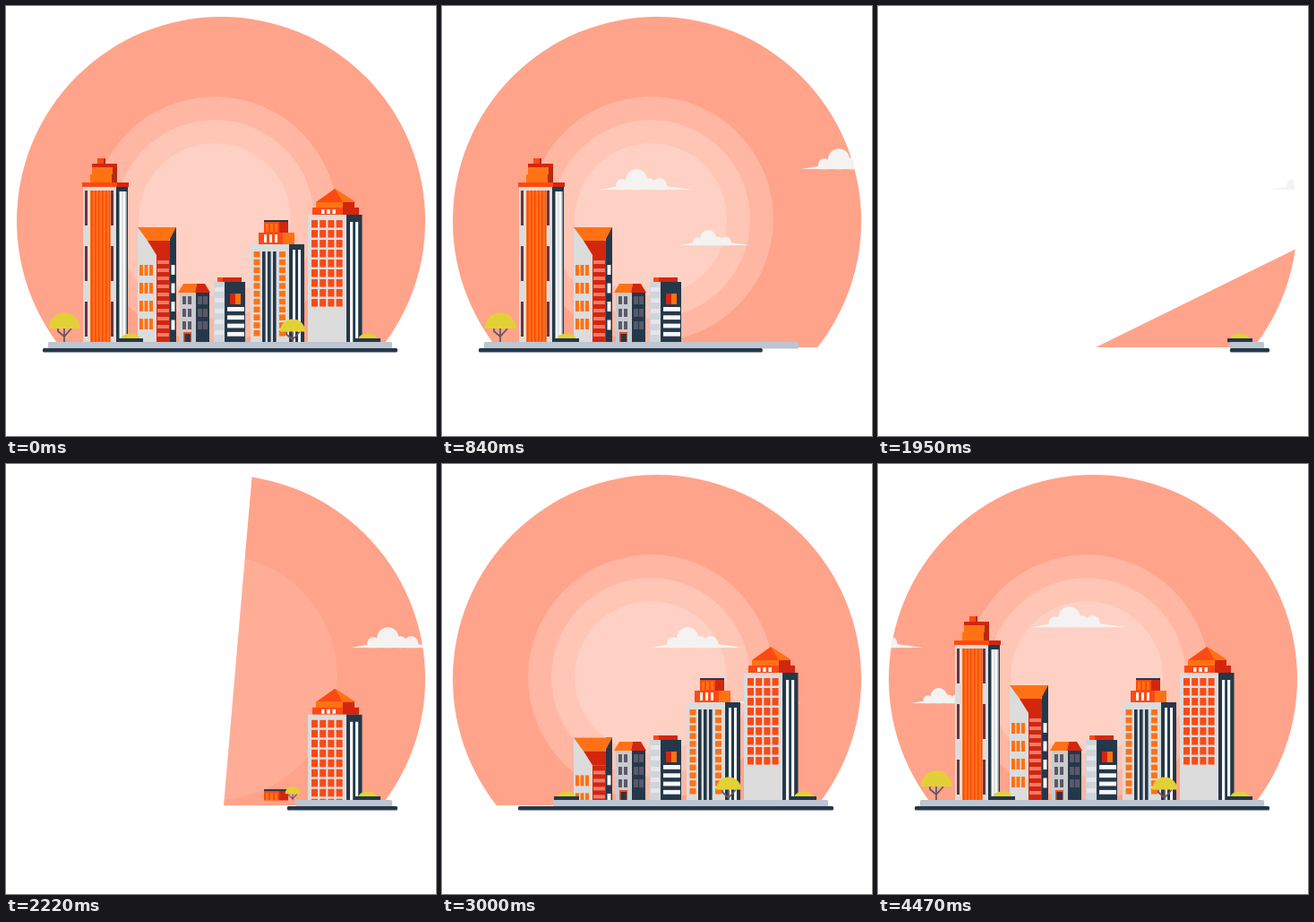
Write an HTML page with a canvas that moves like this. It is 480x480 px and loops after 4.5 s.

```html
<!DOCTYPE html>
<html lang="en">
<head>
<meta charset="utf-8">
<title>City skyline</title>
<style>
  html, body { margin: 0; width: 100%; height: 100%; overflow: hidden; background: #fff; }
  canvas { display: block; width: 100vw; height: 100vh; }
</style>
</head>
<body>
<canvas id="stage" width="480" height="480"></canvas>
<script>
const LOOP = 4500, STEP = 30, MID = 1800, BASE = 375.5, SPEED = 0.195;
const ctx = document.getElementById('stage').getContext('2d');
const C = {
  sky: '#ffa38a', navy: '#24384a', wall: '#dcdcdc', white: '#f7f7f7',
  orange: '#ff7214', flame: '#fb4a14', red: '#d3260f', dark: '#b52a10',
  leaf: '#e2d135', trunk: '#6b5660', ground: '#bcc5d0', cloud: '#f4f3f1',
  pink: '#f07a6c', grey: '#c9cbce', slate: '#5b5868', rust: '#6e3438'
};

const progress = (t, start, time) => Math.min(1, Math.max(0, (t - start) / time));

// 1 while present, 0 while away
const presence = (t, leave, outTime, enter, inTime) =>
  t < MID ? 1 - progress(t, leave, outTime) : progress(t, enter, inTime);

function isolated(paint) {
  ctx.save();
  paint();
  ctx.restore();
}
function rect(x0, x1, y0, y1, color) {
  ctx.fillStyle = color;
  ctx.fillRect(x0, y0, x1 - x0, y1 - y0);
}
// A block seen from the corner: lit front, shaded side
function box(x0, edge, x1, y0, y1, front, side) {
  rect(x0, edge, y0, y1, front);
  rect(edge, x1, y0, y1, side);
}
function trapezoid(a0, a1, y0, b0, b1, y1, color) {
  ctx.fillStyle = color;
  ctx.beginPath();
  ctx.moveTo(a0, y0);
  ctx.lineTo(a1, y0);
  ctx.lineTo(b1, y1);
  ctx.lineTo(b0, y1);
  ctx.fill();
}
function disc(x, y, r, color) {
  ctx.fillStyle = color;
  ctx.beginPath();
  ctx.arc(x, y, r, 0, Math.PI * 2);
  ctx.fill();
}
function grid(x, y, w, h, cols, dx, rows, dy, color) {
  for (let i = 0; i < cols * rows; i++) {
    const left = x + i % cols * dx, top = y + Math.floor(i / cols) * dy;
    rect(left, left + w, top, top + h, color);
  }
}
const row = (x, y, w, h, n, dx, color) => grid(x, y, w, h, n, dx, 1, 0, color);
const column = (x, y, w, h, n, dy, color) => grid(x, y, w, h, 1, 0, n, dy, color);
const stripes = (x, y, w, n, dx, color) => row(x, y, w, BASE - y, n, dx, color);

function tower() {
  box(102, 109, 111, 170, 176, C.flame, C.dark);
  box(96, 119, 124, 176, 188, C.orange, C.dark);
  box(94, 118, 124, 188, 197, C.orange, C.dark);
  rect(96, 124, 176, 180, C.red);
  box(85, 124, 137, 197, 202, C.flame, C.red);
  box(86, 123, 136, 202, BASE, C.wall, C.navy);
  grid(88, 206, 3, 39, 2, 29, 3, 62, C.rust);
  rect(94, 116, 206, BASE, C.orange);
  stripes(95, 206, 1.6, 6, 4, C.flame);
  rect(126.5, 134.5, 207, BASE, C.white);
  stripes(129.5, 207, 1, 2, 3.5, C.grey);
}

function slant() {
  box(147, 183, 190, 247, BASE, C.wall, C.navy);
  trapezoid(147, 190, 247, 158, 182, 262, C.orange);
  trapezoid(158, 183, 262, 168, 183, 278, C.red);
  rect(168, 183, 278, BASE, C.red);
  grid(149, 289, 4, 12, 3, 5.5, 4, 20, C.orange);
  column(169, 284, 13, 4, 10, 9, C.pink);
  column(184.5, 289, 4, 11, 4, 20.5, C.white);
  // sky beside the sloping upper front is covered by the wall
}

function house() {
  trapezoid(198, 213, 310, 192, 211, 320, C.orange);
  trapezoid(213, 222, 310, 211, 228, 320, C.red);
  box(194, 212, 227, 320, BASE, C.grey, C.navy);
  grid(197, 324, 4, 9, 2, 6, 3, 14, C.slate);
  grid(214, 324, 5, 9, 2, 6, 3, 14, C.slate);
  rect(198, 207, 364, BASE, C.flame);
  rect(199.5, 206, 366, BASE, C.navy);
}

function office() {
  box(236, 242, 263, 303, 309, C.flame, C.red);
  box(232, 244, 267, 308, BASE, '#d0d4db', C.navy);
  column(233, 314, 10, 5, 5, 12, '#e4e6ea');
  box(250, 256, 262, 321, 333, C.red, C.orange);
  column(247, 336, 19, 4.8, 4, 9.3, C.white);
}

function block() {
  box(288, 305, 315, 240, 254, C.flame, C.red);
  rect(288, 315, 239, 241, C.navy);
  row(290, 243, 3, 9, 3, 5, C.orange);
  box(282, 309, 322, 253, 266, C.flame, C.orange);
  row(288, 255, 3, 9, 3, 6, C.white);
  box(273, 316, 333, 266, BASE, C.wall, C.navy);
  grid(276.5, 274, 7, 6.5, 2, 28.5, 11, 8.8, C.orange);
  stripes(286, 274, 3.6, 3, 6, C.navy);
  stripes(320, 272, 3, 2, 6, C.white);
}

function pyramid() {
  trapezoid(367, 367, 204, 346, 390, 219, C.flame);
  trapezoid(367, 367, 204, 376, 390, 219, C.orange);
  box(346, 376, 389, 219, 226, C.orange, C.red);
  box(342, 376, 394, 225, 233, C.flame, C.red);
  row(352, 227, 3.5, 5, 3, 6.2, C.white);
  box(337, 380, 397.5, 233, BASE, C.wall, C.navy);
  grid(341, 239, 7, 8.5, 4, 9.2, 9, 11, C.flame);
  stripes(384, 241, 3.2, 2, 6, C.white);
}

// Left to right, each with the height of its top edge
const buildings = [
  [tower, 170], [slant, 247], [house, 309],
  [office, 303], [block, 239], [pyramid, 204]
];

function dome(x, y, rx, ry) {
  ctx.fillStyle = C.leaf;
  ctx.beginPath();
  ctx.ellipse(x, y, rx, ry, 0, Math.PI, 0);
  ctx.fill();
}
function tree(r) {
  const y = r - 33 + (17.5 - r) * 2;
  ctx.strokeStyle = C.trunk;
  ctx.lineWidth = 1.8;
  ctx.beginPath();
  ctx.moveTo(0, 0);
  ctx.lineTo(0, y);
  ctx.moveTo(-7, y);
  ctx.lineTo(-7, y + 3);
  ctx.lineTo(0, y + 9);
  ctx.lineTo(8, y);
  ctx.stroke();
  dome(0, y, r, r);
}
function bush() {
  dome(0, -4, 10.5, 6);
  rect(-14, 14, -4.5, 0, C.navy);
}
const plants = [[65, () => tree(17.5)], [139, bush], [320, () => tree(14)], [404, bush]];

function sky(t) {
  const gone = t < MID ? Math.PI * progress(t, 840, 810) : 0;
  const end = t < MID ? Math.PI : Math.PI * progress(t, 1830, 825);
  if (end <= gone) return;
  isolated(() => {
    ctx.beginPath();
    ctx.moveTo(243, 381);
    ctx.arc(243, 381, 600, -gone, -end, true);
    ctx.clip();
    disc(240, 240, 228, C.sky);
    for (let i = 0; i < 3; i++) {
      ctx.globalAlpha = 0.2 * presence(t, 850 + 90 * i, 180, 2530 - 210 * i, 200);
      disc(233, 238, 85 + 26 * i, '#fff');
    }
  });
}

function cloud(x, base, size) {
  isolated(() => {
    ctx.translate(x, base);
    ctx.scale(size, size);
    ctx.beginPath();
    ctx.rect(0, -30, 108, 30);
    ctx.clip();
    disc(43, -11, 12, C.cloud);
    disc(27, -5, 7, C.cloud);
    disc(57, -6, 7, C.cloud);
    disc(69, -5, 8, C.cloud);
    trapezoid(23, 78, -4, 0, 108, 0, C.cloud);
  });
}
function clouds(t) {
  if (t < 60) return;
  const x = t < MID ? 174 - SPEED * (t - 840) : 436 - SPEED * (t - 1950);
  isolated(() => {
    ctx.beginPath();
    ctx.arc(240, 240, 228, 0, Math.PI * 2);
    ctx.clip();
    ctx.globalAlpha = t < MID ? 1 - progress(t, 960, 240) : 1;
    cloud(x, 205.3, 1);
    cloud(x + 91, 267.3, 0.75);
    cloud(x + 226, 182.3, 1);
  });
}

function city(t) {
  ctx.beginPath();
  ctx.rect(0, 0, 480, BASE);
  ctx.clip();
  buildings.forEach(([draw, top], i) => {
    const shown = presence(t, 1341 - 167 * i, 167, 3030 - 210 * i, 330);
    if (shown) isolated(() => {
      ctx.translate(0, (1 - shown) * (BASE - top));
      draw();
    });
  });
  for (const [x, draw] of plants) {
    const size = presence(t, 1890 - 3.65 * x, 115, 3446 - 4 * x, 90);
    if (size) isolated(() => {
      ctx.translate(x, BASE);
      ctx.scale(size, size);
      draw();
    });
  }
}

// Shrinks to the left, then grows back from the right
function bar(t, x0, x1, y0, y1, leave, inTime, color) {
  const width = (x1 - x0) * presence(t, leave, MID - leave, MID, inTime);
  if (!width) return;
  ctx.fillStyle = color;
  ctx.beginPath();
  ctx.roundRect(t < MID ? x0 : x1 - width, y0, width, y1 - y0, Math.min(1.5, width / 2));
  ctx.fill();
}

function draw(t) {
  rect(0, 480, 0, 480, '#fff');
  sky(t);
  clouds(t);
  isolated(() => city(t));
  bar(t, 47, 431, 375, 382.4, 750, 1500, C.ground);
  bar(t, 41, 437, 382, 386.6, 600, 1350, C.navy);
}

function tick() {
  const t = (performance.now() + 0.5) % LOOP;
  draw(Math.floor(t / STEP) * STEP);
  requestAnimationFrame(tick);
}
tick();
</script>
</body>
</html>
```
